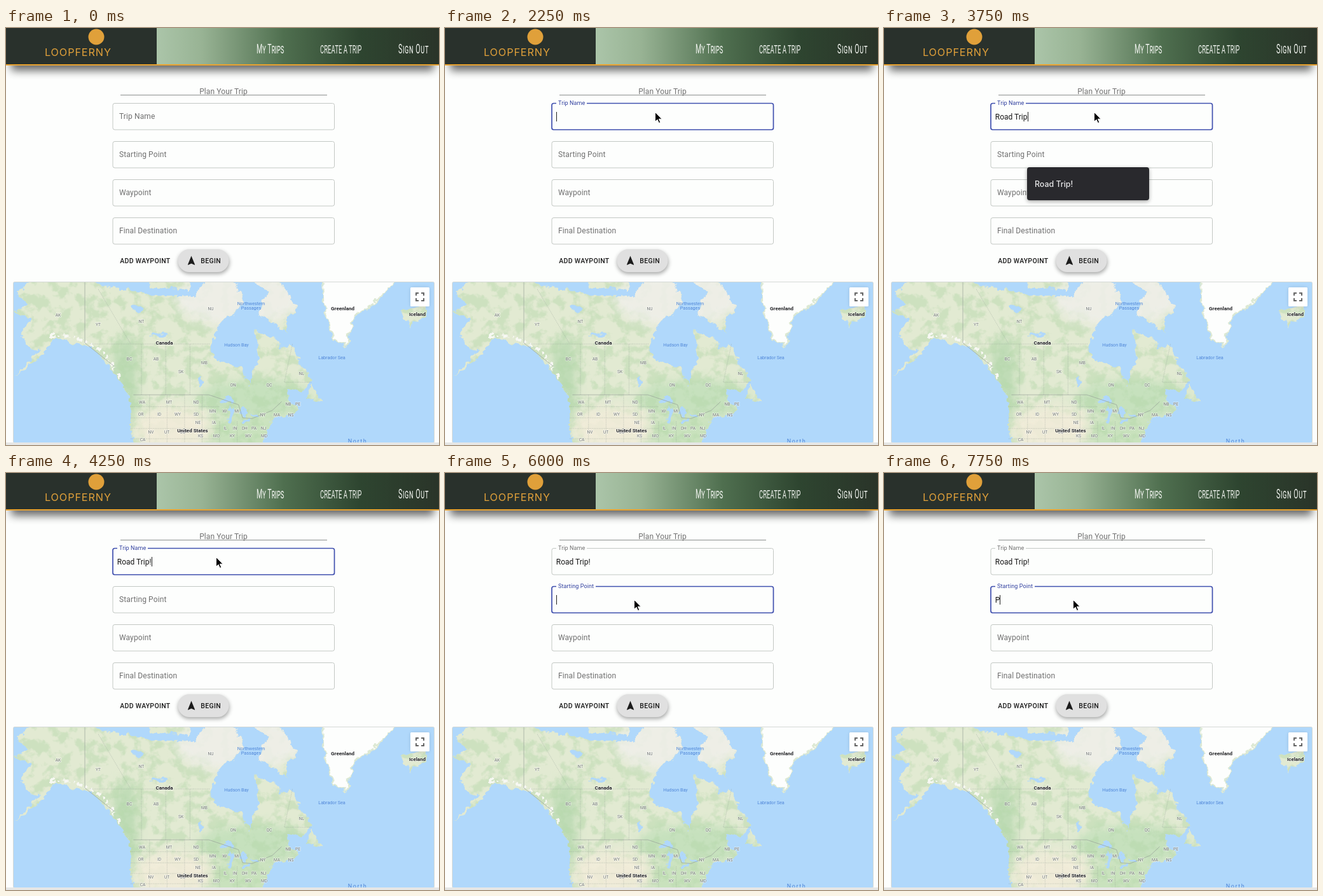
These frames come from a looping animation (681 by 656 pixels, 8000 ms). An HTML page:

```html
<!DOCTYPE html>
<html lang="en">
<head>
<meta charset="utf-8">
<title>Plan Your Trip</title>
<style>
  html, body { margin: 0; width: 100%; height: 100%; overflow: hidden; background: #fdfefd; }
  svg { display: block; width: 681px; height: 656px; font-family: Roboto, sans-serif; }
  .nav { font-size: 20.5px; fill: #f0f3ee; font-variant-caps: small-caps; }
  .label { font-size: 12px; letter-spacing: .11px; fill: #707070; }
  .small { font-size: 9px; letter-spacing: .1px; }
  .entry { font-size: 12px; fill: #161616; white-space: pre; }
  .btn { font-size: 10.5px; font-weight: 500; letter-spacing: .3px; fill: #1c1c1c; }
  .state { font-size: 6.6px; fill: #6f7471; }
  .land { font-size: 8px; font-weight: 700; fill: #202124; }
  .sea { font-size: 7.2px; fill: #4f86d8; }
  #labels text { text-anchor: middle; paint-order: stroke; stroke: #fff; stroke-opacity: .6; stroke-width: 1.4px; }
  #labels .sea { stroke: none; }
</style>
</head>
<body>
<svg viewBox="0 0 681 656">
  <defs>
    <linearGradient id="bar">
      <stop offset="0" stop-color="#abc5a9"/>
      <stop offset=".16" stop-color="#98b394"/>
      <stop offset=".45" stop-color="#4f6f4f"/>
      <stop offset=".72" stop-color="#2e4530"/>
      <stop offset="1" stop-color="#2a3429"/>
    </linearGradient>
    <filter id="blur7" x="-10%" y="-100%" width="120%" height="300%"><feGaussianBlur stdDeviation="7"/></filter>
    <filter id="blur3" x="-20%" y="-40%" width="140%" height="190%"><feGaussianBlur stdDeviation="3"/></filter>
    <filter id="soft" x="-50%" y="-50%" width="200%" height="200%"><feGaussianBlur stdDeviation="8"/></filter>
    <filter id="coast" filterUnits="userSpaceOnUse" x="0" y="380" width="681" height="290" color-interpolation-filters="sRGB">
      <feTurbulence type="fractalNoise" baseFrequency=".09" numOctaves="3" seed="4"/>
      <feDisplacementMap in="SourceGraphic" scale="14" xChannelSelector="R" yChannelSelector="G"/>
    </filter>
    <filter id="terrain" filterUnits="userSpaceOnUse" x="0" y="380" width="681" height="290" color-interpolation-filters="sRGB">
      <feTurbulence type="fractalNoise" baseFrequency=".09" numOctaves="3" seed="4" result="n"/>
      <feDisplacementMap in="SourceGraphic" in2="n" scale="14" xChannelSelector="R" yChannelSelector="G" result="shape"/>
      <feTurbulence type="fractalNoise" baseFrequency=".05" numOctaves="4" seed="11"/>
      <feColorMatrix values="0 0 0 0 .7  0 0 0 0 .84  0 0 0 0 .66  6 0 0 0 -2.8"/>
      <feComponentTransfer><feFuncA type="linear" slope=".45"/></feComponentTransfer>
      <feComposite in2="shape" operator="in" result="woods"/>
      <feMerge><feMergeNode in="shape"/><feMergeNode in="woods"/></feMerge>
    </filter>
    <clipPath id="frame"><rect x="11.5" y="400" width="662" height="252" rx="2"/></clipPath>
    <clipPath id="coastline"><path id="shore"/></clipPath>
  </defs>

  <rect width="681" height="656" fill="#fdfefd"/>
  <rect x="8" y="36" width="665" height="31" fill="#000" opacity=".6" filter="url(#blur7)"/>
  <rect width="681" height="58" fill="#29312c"/>
  <rect x="237" width="444" height="58" fill="url(#bar)"/>
  <rect y="57" width="681" height="2" fill="#eaa32f"/>
  <circle cx="142" cy="14" r="12.5" fill="#e0a03a"/>
  <text x="61" y="43.5" font-family="Inter, sans-serif" font-size="16.2" letter-spacing=".9" fill="#e0a03a">LOOPFERNY</text>
  <g class="nav">
    <text transform="translate(394 40) scale(.52 1)">My Trips</text>
    <text transform="translate(494 40) scale(.52 1)" style="font-size:18.4px">CREATE A TRIP</text>
    <text transform="translate(617 40) scale(.52 1)" letter-spacing="1.2">Sign Out</text>
  </g>

  <text class="label" x="342" y="103.7" text-anchor="middle">Plan Your Trip</text>
  <rect x="180" y="105" width="325" height="1" fill="#8c8f8d"/>
  <g id="fields"></g>

  <text class="btn" x="179.3" y="370">ADD WAYPOINT</text>
  <rect x="270.5" y="351" width="81" height="36" rx="18" fill="#000" opacity=".33" filter="url(#blur3)"/>
  <rect x="270.5" y="348" width="80" height="36" rx="18" fill="#e0e0e0"/>
  <path transform="translate(282.5 357) scale(.75)" fill="#1c1c1c" d="M12 2 4.5 20.29l.71.71L12 18l6.79 3 .71-.71z"/>
  <text class="btn" x="306.3" y="370">BEGIN</text>

  <rect x="11.5" y="399.5" width="662" height="253" rx="2" fill="#b0d8fb" stroke="#d5d9d6"/>
  <g clip-path="url(#frame)">
    <g filter="url(#terrain)"><g id="ground" clip-path="url(#coastline)"></g></g>
    <g filter="url(#coast)"><g id="dry" clip-path="url(#coastline)"></g></g>
    <g id="ice" filter="url(#coast)"></g>
    <g id="lakes" filter="url(#coast)"></g>
    <g id="borders" fill="none" stroke="#8f9892" stroke-width=".6"></g>
    <g id="labels"></g>
    <rect x="637" y="409" width="28" height="29" rx="2" fill="#000" opacity=".15" filter="url(#blur3)"/>
    <rect x="636" y="408" width="30" height="30" rx="1.5" fill="#fff"/>
    <path d="M645 421v-4h4M653 417h4v4M657 425v4h-4M649 429h-4v-4" fill="none" stroke="#666" stroke-width="2"/>
  </g>
  <rect y="652" width="681" height="4" fill="#e6e7e6"/>

  <g id="popup">
    <rect x="225" y="221" width="192" height="52" rx="4" fill="#000" opacity=".35" filter="url(#blur3)"/>
    <rect x="225" y="219" width="192" height="52" rx="4" fill="#29292d"/>
    <text x="237" y="249.8" font-family="Inter, sans-serif" font-size="12.4" font-weight="500" fill="#e9e9ea">Road Trip!</text>
  </g>
  <path id="cursor" d="M.5.5v14.8l3.5-3.2 2.5 5.4 2.3-1L6.4 11.2h4.7z" fill="#000" stroke="#fff"/>
</svg>
<script>
const $ = id => document.getElementById(id);
const LOOP = 8000, STEP = 250;

function add(parent, tag, attrs, text) {
  const el = document.createElementNS("http://www.w3.org/2000/svg", tag);
  for (const k in attrs) el.setAttribute(k, attrs[k]);
  if (text) el.textContent = text;
  return parent.appendChild(el);
}
const show = (el, on) => { el.style.display = on ? "" : "none"; };

// Mercator projection; points are "degrees west,degrees north".
function project(w, lat) {
  const m = Math.log(Math.tan(Math.PI / 4 + lat * Math.PI / 360));
  return [124 + (141 - w) * 4.24, 577 - 240 * (m - 0.984)];
}
const trace = pts => "M" + pts.split(" ").map(p => project(...p.split(",").map(Number))).join("L");
const area = pts => trace(pts) + "Z";
function blob(parent, w, lat, rx, ry, attrs) {
  const [cx, cy] = project(w, lat);
  return add(parent, "ellipse", { cx, cy, rx, ry, ...attrs });
}

// Coasts are a few key points; the displacement filter makes them ragged.
function buildLand() {
  const mainland = "156,71.5 135,69.3 115,68 100,67.8 94,71 85,69.5 82,67 87,64.8 91,63.8 94.7,59 " +
    "92.5,57 82.3,55.2 80,51.2 79,54.5 76.6,57 78,62.4 70,61 67,58.6 64.5,60 60,55 56,52.5 60,50.2 66,50.2 " +
    "65,46.5 61,45.5 65.5,43.6 70.5,43 75.6,37 75,30 121,30 124,40 124,48 130.5,54.5 138,59.3 " +
    "144,60 152,61 158,57 167,53.6 157.5,58.7 162,59.5 165,62 161,64.3 167,65.5 162,66.5 166.5,68.3";
  const baffin = "88,73 73,68.2 77,65 73,64.3 66,62 66,64.8 62,66 69,70";
  const victoria = "117,69 102,68.8 104,73 118,73";
  const newfoundland = "59,47.7 57,51.3 53,47.2";
  const iceland = "24,65.8 20,63.3 14,64.6 15,66.3";
  $("shore").setAttribute("d", [mainland, baffin, victoria, newfoundland, iceland].map(area).join(""));

  const ground = $("ground"), dry = $("dry"), filter = "url(#soft)";
  add(ground, "rect", { y: 380, width: 681, height: 290, fill: "#e2ead2" });
  blob(ground, 126, 52, 22, 75, { fill: "#bfdcb6", filter });
  blob(ground, 78, 48, 90, 32, { fill: "#c6e1bd", filter });
  blob(ground, 80, 38, 75, 32, { fill: "#c9e2bd", filter });
  blob(dry, 84, 67.5, 100, 44, { fill: "#f0efea", opacity: .85, filter });
  blob(dry, 108, 40, 62, 34, { fill: "#f3ecda", opacity: .85, filter });
  add(dry, "path", { d: trace("154,61.5 144,61.4 135,59 127,52.5"), fill: "none",
    stroke: "#f7f8f3", "stroke-width": 5, "stroke-dasharray": "9 4 3 6" });

  add($("ice"), "path", { d: area("53,72 52.5,67 49,61 44,59.6 41,65 35,66.3 22,71"),
    fill: "#fdfefd", stroke: "#dde9d3", "stroke-width": 2 });
  const water = (...spot) => blob($("lakes"), ...spot, { fill: "#b0d8fb" });
  water(88, 47.6, 13, 4);
  water(86.8, 43.8, 3.5, 11);
  water(82, 44.6, 6, 7);
  water(81, 42.2, 8, 2.5);
  water(77.8, 43.7, 6, 2);
  water(98, 52.2, 3, 9);
  water(121, 66, 9, 6);
  water(113, 61.7, 13, 3);
}

function buildBorders() {
  const line = (d, dashed) => add($("borders"), "path",
    { d: trace(d), opacity: dashed ? .65 : 1, "stroke-dasharray": dashed ? "1.5 1.2" : "none" });
  line("141,72 141,60.2 130,55.5");
  line("123,49 95,49 84,46.5 82.5,43 79,42.8 71.5,45 68,47.3");
  line("139,60 94.5,60", true);
  line("136,68.8 124,60", true);
  line("64,60 67,52 57,52", true);
  for (let w = 120; w >= 102; w -= 9) line(`${w},60 ${w},49`, true);
  for (let w = 117; w > 78; w -= 6.5) line(`${w},${w > 96 ? 49 : 42} ${w},35`, true);
  for (let lat = 46; lat > 36; lat -= 3) line(`124,${lat} 91,${lat}`, true);
}

function buildLabels() {
  const put = (cls, text, x, y) => add($("labels"), "text", { class: cls, x, y }, text);
  const row = (names, x, y, gap = 0) =>
    names.split(" ").forEach((name, i) => put("state", name, x + i * gap, y));
  row("AK", 82, 454);
  row("YT", 145, 469);
  row("NT", 213, 464);
  row("NU", 322, 444);
  row("BC AB", 194, 523, 42);
  row("SK", 275, 543);
  row("MB", 312, 529);
  row("ON QC", 357, 564, 57);
  row("NL", 465, 546);
  row("WA MT ND", 214, 591, 42.5);
  row("NB PE", 444, 594, 15);
  row("MN WI MI", 325, 605, 19);
  row("OR ID WY SD", 212, 610, 29);
  row("NY MA NS", 404, 611, 22);
  row("NE IA", 302, 623, 25);
  row("IL IN OH PA NJ", 345, 632, 15);
  row("NV UT CO", 228, 638, 25);
  row("KS MO KY WV MD", 306, 644, 25);
  row("CA", 215, 650);
  put("land", "Canada", 249, 498);
  put("land", "United States", 293.5, 636);
  put("land", "Greenland", 529.5, 444);
  put("land", "Iceland", 647, 453);
  put("sea", "Hudson Bay", 362.5, 501);
  put("sea", "Labrador Sea", 512.5, 521);
  put("sea", "Northwestern", 385.5, 436);
  put("sea", "Passages", 385.5, 443);
  put("sea", "North", 553, 653).style.cssText = "font-size:9px;letter-spacing:1.6px";
}

function makeField(name, row, notch) {
  const y = 118 + row * 60, g = add($("fields"), "g");
  const box = add(g, "rect", { x: 168, y: y + .5, width: 348.5, height: 41.5, rx: 3, fill: "none" });
  const gap = add(g, "rect", { x: 175, y: y - 1, width: notch, height: 4, fill: "#fdfefd" });
  const label = add(g, "text", { x: 178 }, name);
  const entry = add(g, "text", { class: "entry", x: 174.8, y: y + 26 });
  const caret = add(g, "rect", { y: y + 14, width: 1, height: 15, fill: "#222" });
  return (focus, text, blink) => {
    const raised = focus || text !== "";
    box.setAttribute("stroke", focus ? "#3f4fae" : "#c3c8c4");
    box.setAttribute("stroke-width", focus ? 1.7 : 1);
    show(gap, raised);
    label.setAttribute("class", raised ? "label small" : "label");
    label.setAttribute("y", raised ? y + 3 : y + 25);
    label.style.fill = focus ? "#303f9f" : "";
    entry.textContent = text;
    const end = text ? entry.getComputedTextLength() : 0;
    caret.setAttribute("x", Math.round(174.9 + end));
    show(caret, focus && blink);
  };
}

buildLand();
buildBorders();
buildLabels();
const [tripName, start, ...idle] = [["Trip Name", 48], ["Starting Point", 62], ["Waypoint", 46], ["Final Destination", 60]]
  .map(([name, notch], i) => makeField(name, i, notch));
idle.forEach(set => set(false, "", false));

// Pointer positions, one per step from the given time.
const moves = [
  { from: 500, path: [[571, -13], [410, 60], [341, 119], [330, 132]] },
  { from: 5000, path: [[323, 141], [317, 158], [306, 178], [297, 199]] }
];
function pointer(t) {
  const move = moves.filter(m => m.from <= t).pop();
  return move && move.path[Math.min(move.path.length - 1, Math.floor((t - move.from) / STEP))];
}

// Each input event: time, focused field, both texts. The caret restarts its blink at every event.
const events = [
  [0, 0, "", ""],
  [1250, 0, "", ""],
  [2750, 1, "R", ""],
  [3000, 1, "Roa", ""],
  [3250, 1, "Road ", ""],
  [3500, 1, "Road T", ""],
  [3750, 1, "Road Trip", ""],
  [4250, 1, "Road Trip!", ""],
  [6000, 2, "Road Trip!", ""],
  [7750, 2, "Road Trip!", "P"]
];

function draw(t) {
  const [since, field, name, place] = events.filter(e => e[0] <= t).pop();
  const focus = t >= 1500 && field === 0 ? 1 : field;
  const blink = Math.floor((t - since) / 500) % 2 === 0;
  const tip = pointer(t);
  tripName(focus === 1, name, blink);
  start(focus === 2, place, blink);
  show($("popup"), t >= 2750 && t < 4250);
  show($("cursor"), tip);
  if (tip) $("cursor").setAttribute("transform", `translate(${tip})`);
}

let began = null, last = -1;
function tick(now) {
  if (began === null) began = now;
  const step = Math.floor((now - began) % LOOP / STEP);
  if (step !== last) draw(step * STEP);
  last = step;
  requestAnimationFrame(tick);
}
draw(0);
requestAnimationFrame(tick);
</script>
</body>
</html>
```
